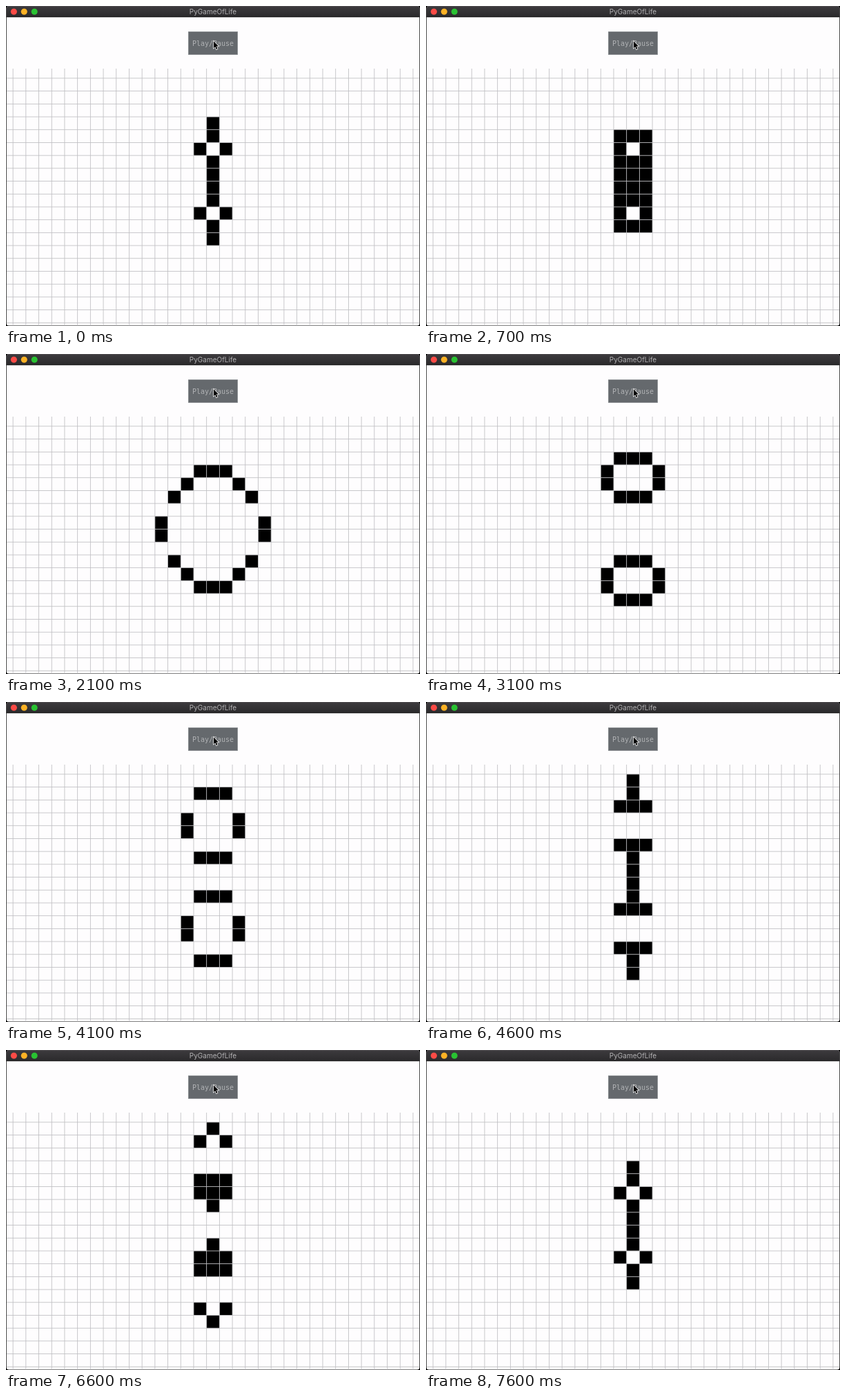
These frames come from a looping animation (600 by 465 pixels, 8000 ms). An HTML page with a canvas:

```html
<!DOCTYPE html>
<html>
<head>
<meta charset="utf-8">
<title>PyGameOfLife</title>
<style>
html, body { margin: 0; width: 100%; height: 100%; overflow: hidden; background: #000; }
canvas { display: block; }
</style>
</head>
<body>
<canvas id="stage" width="600" height="465"></canvas>
<script>
const ctx = document.getElementById('stage').getContext('2d');

const LOOP = 8000, STEP = 500, OFFSET = 100, PERIOD = 15;
const PITCH = 18.703, LINE = 0.85, LEFT = 9.7, TOP = 104.5;
const COLS = 31, ROWS = 19, GRID_TOP = 91;
const PAPER = '#fefdfe', GRID = '#bfbfc2';

// The starting figure, from its top row down; it sits at row 3, column 14.
const SEED = ['.#.', '.#.', '#.#', '.#.', '.#.', '.#.', '.#.', '#.#', '.#.', '.#.'];

function seedBoard() {
  const board = Array.from({ length: ROWS }, () => Array(COLS).fill(0));
  SEED.forEach((line, r) => [...line].forEach((c, i) => {
    board[r + 3][i + 14] = c === '#' ? 1 : 0;
  }));
  return board;
}

function nextBoard(board) {
  return board.map((row, r) => row.map((alive, c) => {
    let count = -alive;
    for (let y = r - 1; y <= r + 1; y++)
      for (let x = c - 1; x <= c + 1; x++) count += board[y]?.[x] ?? 0;
    return count === 3 || (alive && count === 2) ? 1 : 0;
  }));
}

const boards = [seedBoard()];
while (boards.length < PERIOD) boards.push(nextBoard(boards[boards.length - 1]));

function rect(color, x, y, w, h) {
  ctx.fillStyle = color;
  ctx.fillRect(x, y, w, h);
}

function text(string, font, color, y) {
  ctx.font = font;
  ctx.fillStyle = color;
  ctx.textAlign = 'center';
  ctx.fillText(string, 300, y);
}

function drawBoard(board) {
  board.forEach((row, r) => row.forEach((alive, c) => {
    if (alive) rect('#000', LEFT + c * PITCH + LINE / 2, TOP + r * PITCH + LINE / 2, PITCH, PITCH);
  }));
  for (let c = 0; c <= COLS; c++) rect(GRID, LEFT + c * PITCH, GRID_TOP, LINE, 465 - GRID_TOP);
  for (let r = 0; r <= ROWS; r++) rect(GRID, 1, TOP + r * PITCH, 598, LINE);
}

function drawTitleBar() {
  const shade = ctx.createLinearGradient(0, 0, 0, 16);
  shade.addColorStop(0, '#3d3b3e');
  shade.addColorStop(1, '#2b2a2c');
  rect(shade, 0, 0, 600, 16);
  rect('#59575a', 3, 0, 594, 0.7);
  rect('#0c0c0d', 0, 15.4, 600, 0.9);
  ['#fc4b46', '#fdb225', '#29c232'].forEach((color, i) => {
    ctx.fillStyle = color;
    ctx.beginPath();
    ctx.arc(11.4 + i * 14.9, 8.3, 4.5, 0, Math.PI * 2);
    ctx.fill();
  });
  text('PyGameOfLife', '10px Inter, sans-serif', '#b3b2b4', 12);
}

function drawButton() {
  rect('#94979a', 264, 37, 72, 34);
  rect('#65696d', 264.75, 37.75, 70.5, 32.5);
  text('Play/Pause', '10px "DejaVu Sans Mono", monospace', '#b1b3b5', 57.5);
}

function drawCursor() {
  const arrow = new Path2D('M301 51.2V61.2L303.2 59.2L304.8 63L306.5 62.3L304.9 58.6H308Z');
  ctx.lineWidth = 1.4;
  ctx.strokeStyle = '#fff';
  ctx.stroke(arrow);
  ctx.fillStyle = '#000';
  ctx.fill(arrow);
}

function draw(now) {
  const time = now % LOOP;
  const generation = Math.max(0, Math.floor((time - OFFSET) / STEP)) % PERIOD;

  rect('#000', 0, 0, 600, 465);
  ctx.save();
  ctx.beginPath();
  ctx.roundRect(0.7, 0, 598.6, 464.6, 3.5);
  ctx.clip();
  rect(PAPER, 0, 0, 600, 465);
  drawBoard(boards[generation]);
  drawTitleBar();
  drawButton();
  drawCursor();
  ctx.restore();
}

const start = performance.now();
function tick() {
  draw(performance.now() - start);
  requestAnimationFrame(tick);
}
tick();
</script>
</body>
</html>
```
